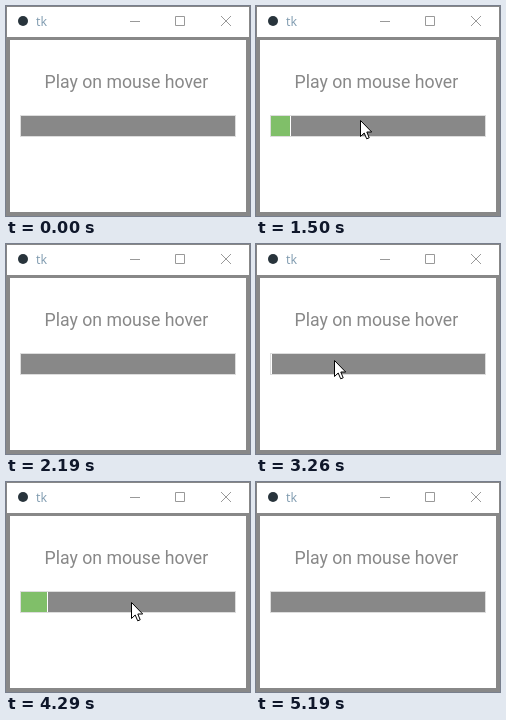
Animation of 244x210 px, one loop 5490 ms. Source, as an HTML page:

```html
<!DOCTYPE html>
<html lang="en">
<head>
<meta charset="utf-8">
<title>Play on mouse hover</title>
<style>
  html, body { margin: 0; width: 100%; height: 100%; overflow: hidden; background: #fff; }
  svg { display: block; width: 244px; height: 210px; }
</style>
</head>
<body>
<svg viewBox="0 0 244 210">
  <rect width="244" height="210" fill="#888"/>
  <rect x="1" y="1" width="242" height="30" fill="#fff"/>
  <rect x="4" y="34" width="236" height="172" fill="#fff"/>

  <circle cx="17" cy="15" r="5" fill="#28343c"/>
  <text x="30" y="20" font-family="'Open Sans', sans-serif" font-size="12.5" fill="#7d99ae">tk</text>
  <path d="M124 15.5h10M169.5 10.5h9v9h-9zM215 10l10 10M225 10l-10 10" fill="none" stroke="#999"/>

  <text x="38.5" y="82" font-family="Roboto, sans-serif" font-size="17.7" fill="#888">Play on mouse hover</text>

  <rect x="14.5" y="109.5" width="215" height="21" fill="#888" stroke="#ddd"/>
  <rect id="edge" x="15" y="110" height="20" fill="#fff"/>
  <rect id="fill" x="15" y="110" height="20" fill="#80bf69"/>

  <path id="cursor" d="M.5 .5V16.5L4.2 13L6.7 18.8L9.2 17.8L6.8 12H11.7Z" fill="#fff" stroke="#000"/>
</svg>
<script>
const LOOP = 5490, SPEED = 0.025;

// Each hover: the pointer glides in along one curve, rests, and leaves along another.
const hovers = [
  { start: 690, settled: 910, leave: 1970, end: 2190,
    enter: [[2, 109], [70, 131], [104, 114]], exit: [[104, 114], [80, 127], [0, 74]] },
  { start: 3190, settled: 3410, leave: 4970, end: 5190,
    enter: [[7, 109], [80, 116], [125, 120]], exit: [[125, 120], [95, 140], [0, 74]] }
];

const [edge, fill, cursor] = ['edge', 'fill', 'cursor'].map(id => document.getElementById(id));
const clamp = v => Math.min(1, Math.max(0, v));
const curve = ([a, b, c], u) =>
  a.map((v, i) => Math.round((1 - u) ** 2 * v + 2 * u * (1 - u) * b[i] + u * u * c[i]));

function pointerAt(h, t) {
  if (t < h.leave) {
    const u = clamp((t - h.start) / (h.settled - h.start));
    return curve(h.enter, 1 - (1 - u) ** 2);
  }
  return curve(h.exit, clamp((t - h.leave) / (h.end - h.leave)) ** 2);
}

function draw(t) {
  const h = hovers.find(h => t >= h.start && t < h.end);
  const width = h ? Math.floor((t - h.start) * SPEED) : 0;
  edge.setAttribute('width', width);
  fill.setAttribute('width', Math.max(0, width - 1));
  cursor.style.display = h ? '' : 'none';
  if (h) cursor.setAttribute('transform', `translate(${pointerAt(h, t)})`);
}

const began = performance.now();
function frame() {
  draw((performance.now() - began) % LOOP);
  requestAnimationFrame(frame);
}
frame();
</script>
</body>
</html>
```
